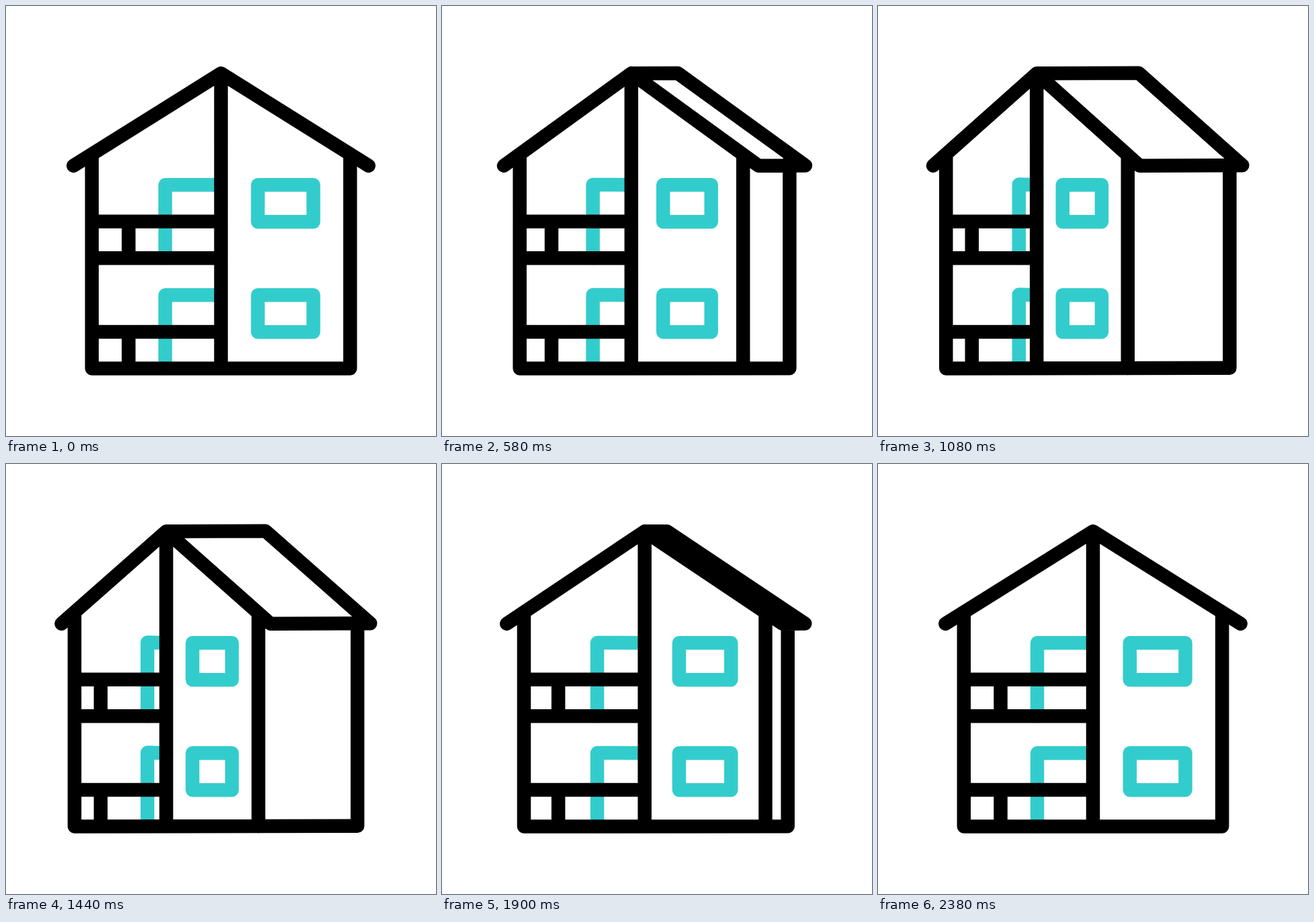
These frames come from a looping animation (640 by 640 pixels, 2.4 s). An HTML page:

```html
<!DOCTYPE html>
<html lang="en">
<head>
<meta charset="utf-8">
<title>Turning house</title>
<style>
  html, body { margin: 0; width: 100%; height: 100%; overflow: hidden; background: #fff; }
  svg { display: block; width: 100%; height: 100%; }
  path {
    fill: none;
    stroke-width: 20.5;
    stroke-linecap: round;
    stroke-linejoin: round;
    animation: 2400ms cubic-bezier(.75, 0, .25, 1) infinite;
  }
  .frame { stroke: #000; animation-name: turn-frame; }
  .floor { stroke: #3cc; animation-name: turn-floor; }

  /* Roof, outer walls, front walls, then balcony rails and posts */
  @keyframes turn-frame {
    0%, 99.17%, 100% {
      d: path("M100.3 237.7 L320 100.3 L539.7 237.7 L539.7 237.7 L320 100.3 L320 100.3 M127.8 220.5 V539.5 L512.2 539.5 V225 M512.2 220.5 V539.5 M320 100.3 V539.5 M127.8 320.8 H320 M127.8 375.3 H320 M127.8 485 H320 M182.5 320.8 V375.3 M182.5 485 V539.5");
    }
    49.58%, 50% {
      d: path("M81.9 237.7 L235.7 100.3 L388.4 237.7 L542.3 237.2 L388.6 99.8 L235.7 100.3 M101.1 220.5 V539.5 L523.5 538.8 V237 M371 222 V539.5 M235.7 100.3 V539.5 M101.1 320.8 H235.7 M101.1 375.3 H235.7 M101.1 485 H235.7 M139.5 320.8 V375.3 M139.5 485 V539.5");
    }
  }

  /* Door and window of one storey */
  @keyframes turn-floor {
    0%, 99.17%, 100% {
      d: path("M320 266.2 L237 266.2 V375 M374.8 266.2 H457.5 V321.2 H374.8 Z");
    }
    49.58%, 50% {
      d: path("M235.7 266.2 L209.6 265.6 V375 M274.2 266.2 H332.2 V321.2 H274.2 Z");
    }
  }
</style>
</head>
<body>
<svg viewBox="0 0 640 640">
  <path class="floor"/>
  <path class="floor" transform="translate(0 164)"/>
  <path class="frame"/>
</svg>
</body>
</html>
```
